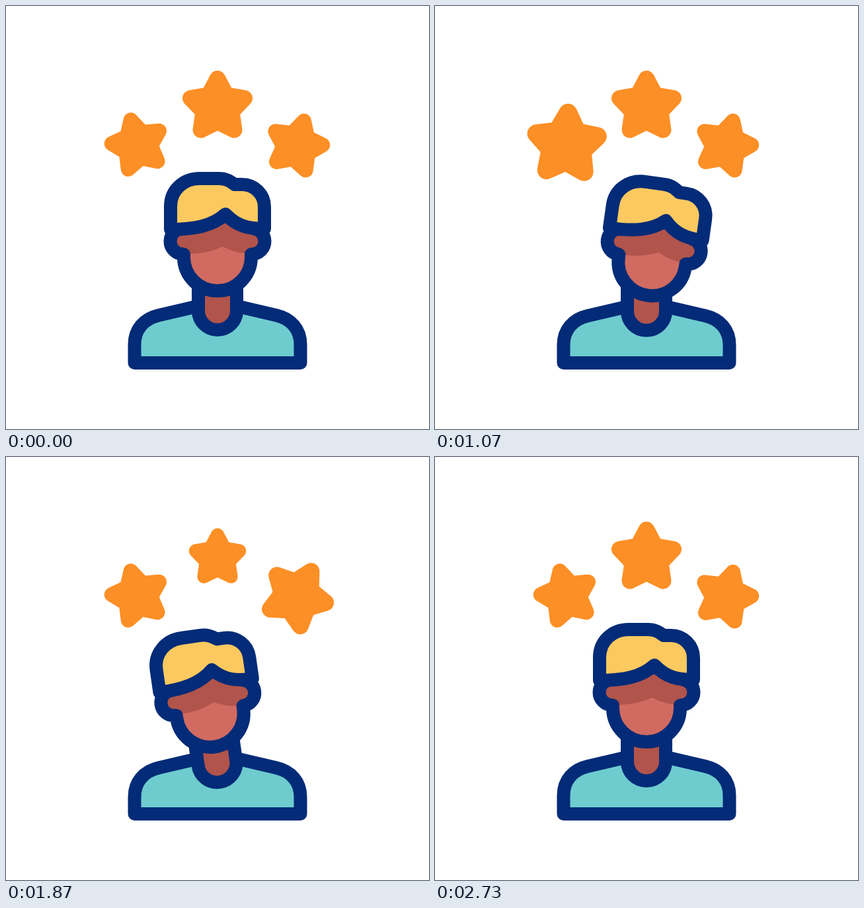
An HTML page with a canvas for the animation above (3 s loop, 640 by 640 pixels).

```html
<!DOCTYPE html>
<html lang="en">
<head>
<meta charset="utf-8">
<title>Person with three stars</title>
<style>
  html, body { margin: 0; height: 100%; overflow: hidden; background: #fff; }
  canvas { display: block; width: 100vw; height: 100vh; }
</style>
</head>
<body>
<canvas id="stage" width="640" height="640"></canvas>
<script>
const ctx = document.getElementById('stage').getContext('2d');
const LOOP = 3000;
const NAVY = '#032b77', TEAL = '#6ecccf', SKIN = '#d16b61', SHADE = '#b1544b',
      HAIR = '#fbc95f', ORANGE = '#fc8f25';

const neck = new Path2D('M291 420 V461 A29 29 0 0 0 349 461 V420');
const face = new Path2D('M268 336.5 A19.5 19.5 0 0 0 268 375.5 L269 376 V380 ' +
  'A51 51 0 0 0 371 380 V376 L372 375.5 A19.5 19.5 0 0 0 372 336.5');
const shade = new Path2D('M250 337 L332 318 L390 337 V374.5 H362 Q345 373 328 364 Q308 374 279 375 H250 Z');
const hair = new Path2D('M249 338 V303 C249 279 268 261 293 261 H322 C333 261 339 265 346 270 H357 ' +
  'C376 270 391 285 391 304 V337 C368 337 350 334 332 315 C312 333 285 338 249 338 Z');

// Eased value at time t from [time, value] keys.
function track(t, keys) {
  if (t <= keys[0][0]) return keys[0][1];
  for (let i = 1; i < keys.length; i++) {
    const [t0, a] = keys[i - 1], [t1, b] = keys[i];
    if (t < t1) {
      const u = (t - t0) / (t1 - t0);
      return a + (b - a) * u * u * (3 - 2 * u);
    }
  }
  return keys[keys.length - 1][1];
}

function rotateAt(x, y, degrees) {
  ctx.translate(x, y);
  ctx.rotate(degrees * Math.PI / 180);
  ctx.translate(-x, -y);
}

function paint(path, fill) {
  ctx.fillStyle = fill;
  ctx.fill(path);
  ctx.stroke(path);
}

function star(x, y, size, tilt, start, peak, t) {
  const grow = track(t, [[start, 1], [start + 333, peak], [start + 667, 0.81], [start + 1000, 1]]);
  const turn = track(t, [[start, 0], [start + 333, 20], [start + 667, 0]]);
  ctx.save();
  ctx.translate(x, y);
  ctx.rotate((tilt + turn) * Math.PI / 180);
  ctx.scale(size * grow, size * grow);
  ctx.beginPath();
  for (let i = 0; i < 5; i++) {
    const tip = (i * 0.4 - 0.5) * Math.PI, notch = tip + Math.PI / 5;
    ctx.arc(42.8 * Math.cos(tip), 42.8 * Math.sin(tip), 12.3, tip - 1.08, tip + 1.08);
    ctx.lineTo(36 * Math.cos(notch), 36 * Math.sin(notch));
  }
  ctx.fillStyle = ORANGE;
  ctx.fill();
  ctx.restore();
}

function person(t) {
  const drop = track(t, [[1000, 0], [1480, 14], [2000, 0]]);
  const nod = track(t, [[333, 0], [833, 6], [1000, 6], [2000, 5], [2233, 5], [2733, 0]]);
  const headTurn = track(t, [[333, 0], [833, 8.5], [1000, 8.5], [1480, 0]]);
  const neckTurn = track(t, [[1480, 0], [2000, -9.6], [2233, -9.6], [2733, 0]]);
  const y = v => v + drop;

  ctx.strokeStyle = NAVY;
  ctx.lineWidth = 20;
  ctx.lineJoin = 'round';

  paint(new Path2D(`M194.5 540 V${y(512)} C194.5 ${y(489)} 209 ${y(473)} 231 ${y(468)} L291 ${y(454)} ` +
    `H349 L409 ${y(468)} C431 ${y(473)} 445.5 ${y(489)} 445.5 ${y(512)} V540 Z`), TEAL);

  ctx.save();
  ctx.translate(0, drop);
  rotateAt(320, 465, neckTurn);
  paint(neck, SHADE);

  ctx.translate(0, nod);
  rotateAt(320, 440, headTurn);
  ctx.fillStyle = SKIN;
  ctx.fill(face);
  ctx.fillStyle = SHADE;
  ctx.fill(shade);
  ctx.stroke(face);
  paint(hair, HAIR);
  ctx.restore();
}

function draw(now) {
  const t = now % LOOP;
  ctx.fillStyle = '#fff';
  ctx.fillRect(0, 0, 640, 640);
  star(199, 210.3, 0.913, -15, 667, 1.3, t);
  star(320, 152.8, 1, 0, 1167, 1.2, t);
  star(440, 211.6, 0.913, 16, 1667, 1.2, t);
  person(t);
}

const begin = performance.now();
function frame() {
  draw(performance.now() - begin);
  requestAnimationFrame(frame);
}
frame();
</script>
</body>
</html>
```
